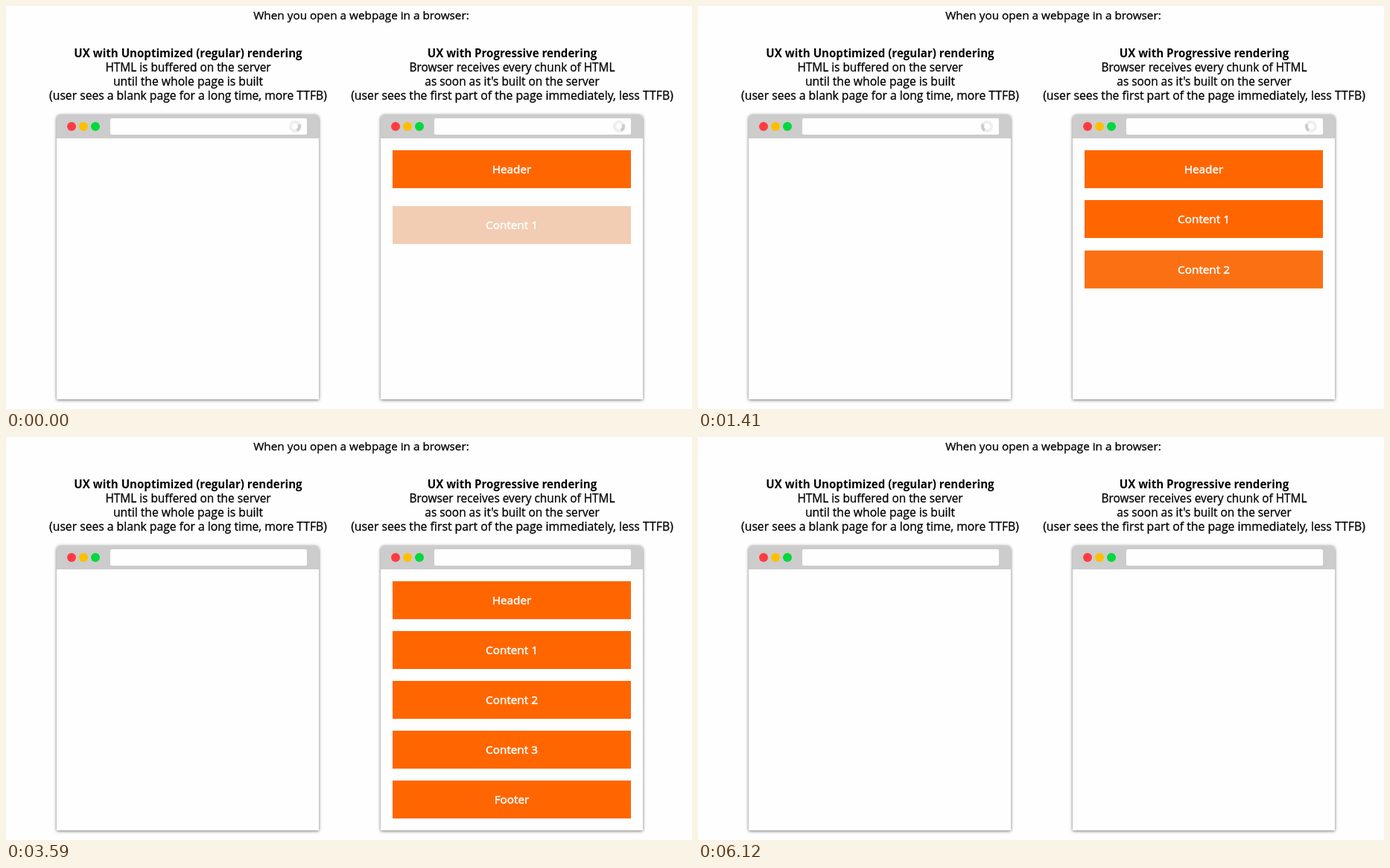
Write an HTML page that moves like this. It is 921x542 px and loops after 6.63 s.

```html
<!DOCTYPE html>
<html lang="en">
<head>
<meta charset="utf-8">
<title>Progressive rendering</title>
<style>
  html, body { margin: 0; width: 100%; height: 100%; overflow: hidden; background: #fefefe; }
  svg { display: block; width: 921px; height: 542px; }
  text { font-family: "Open Sans", "Noto Sans", sans-serif; text-anchor: middle; stroke: #000; stroke-width: .3px; }
  .bold { font-weight: 700; stroke: none; }
  .label { font-size: 15.3px; fill: #fff; stroke: #fff; stroke-width: .5px; }
  .frame { filter: drop-shadow(0 1px 2px rgba(0, 0, 0, .55)); }

  .page, .c1, .c2, .c3, .foot, .all, .load { animation: 6630ms infinite both; }
  .page { animation-name: page; animation-timing-function: step-end; }
  .c1 { animation-name: c1; }
  .c2 { animation-name: c2; }
  .c3 { animation-name: c3; }
  .foot { animation-name: foot; }
  .all { animation-name: all; }
  .load { animation-name: load; animation-timing-function: linear; }
  .spin { transform-origin: 388px 162px; animation: spin 6630ms linear infinite; }

  @keyframes page {
    0% { opacity: 1; }
    92.308%, 100% { opacity: 0; }
  }
  /* Each block rises 12px while it fades in from a duller tone; the first is already on its way. */
  @keyframes c1 {
    0% { opacity: .32; fill: #d86517; transform: translateY(8.2px); animation-timing-function: cubic-bezier(.2, .5, .3, 1); }
    10.709%, 100% { opacity: 1; fill: #f60; transform: translateY(0); }
  }
  @keyframes c2 {
    0%, 12.066% { opacity: 0; fill: #c8641e; transform: translateY(12px); animation-timing-function: ease; }
    25.641%, 100% { opacity: 1; fill: #f60; transform: translateY(0); }
  }
  @keyframes c3 {
    0%, 26.923% { opacity: 0; fill: #c8641e; transform: translateY(12px); animation-timing-function: ease; }
    40.498%, 100% { opacity: 1; fill: #f60; transform: translateY(0); }
  }
  @keyframes foot {
    0%, 41.629% { opacity: 0; fill: #c8641e; transform: translateY(12px); animation-timing-function: ease; }
    55.204%, 100% { opacity: 1; fill: #f60; transform: translateY(0); }
  }
  @keyframes all {
    0%, 56.41% { opacity: 0; transform: translateY(12px); animation-timing-function: ease; }
    69.231%, 100% { opacity: 1; transform: translateY(0); }
  }
  @keyframes load {
    0%, 48.265% { opacity: 1; }
    54.148%, 100% { opacity: 0; }
  }
  /* One turn per second over 6.63 s. */
  @keyframes spin {
    from { transform: rotate(108deg); }
    to { transform: rotate(2494.8deg); }
  }
</style>
</head>
<body>
<svg viewBox="0 0 921 542">
  <defs>
    <g id="window">
      <path class="frame" d="M68 529V151a5 5 0 0 1 5-5H415a5 5 0 0 1 5 5V529z" fill="#fefefe"/>
      <path d="M68 178V151a5 5 0 0 1 5-5H415a5 5 0 0 1 5 5V178z" fill="#ccc"/>
      <circle cx="88" cy="162" r="6" fill="#ff3b41"/>
      <circle cx="104" cy="162" r="6" fill="#ffbf00"/>
      <circle cx="120" cy="162" r="6" fill="#00d93c"/>
      <rect x="140" y="151" width="264" height="22" rx="2" fill="#fefefe"/>
    </g>
    <g id="spinner" fill="none" stroke-width="4">
      <circle cx="388" cy="162" r="6" stroke="#eee"/>
      <path d="M383.76 157.76A6 6 0 0 1 392.24 157.76" stroke="#c9c9c9"/>
    </g>
    <rect id="bar" x="84" width="320" height="51"/>
    <g id="header"><use href="#bar" y="194"/><text class="label" x="244" y="225">Header</text></g>
    <g id="one"><use href="#bar" y="261"/><text class="label" x="244" y="292">Content 1</text></g>
    <g id="two"><use href="#bar" y="328"/><text class="label" x="244" y="359">Content 2</text></g>
    <g id="three"><use href="#bar" y="395"/><text class="label" x="244" y="426">Content 3</text></g>
    <g id="footer"><use href="#bar" y="462"/><text class="label" x="244" y="493">Footer</text></g>
  </defs>

  <text x="477" y="18" font-size="15.3">When you open a webpage in a browser:</text>

  <text class="bold" x="244.5" y="69" font-size="15.1">UX with Unoptimized (regular) rendering</text>
  <text x="244.5" y="88" font-size="15.4">HTML is buffered on the server</text>
  <text x="244.5" y="107" font-size="15.7">until the whole page is built</text>
  <text x="244.5" y="126" font-size="15.7">(user sees a blank page for a long time, more TTFB)</text>

  <text class="bold" x="679.5" y="69" font-size="15.1">UX with Progressive rendering</text>
  <text x="679.5" y="88" font-size="15.4">Browser receives every chunk of HTML</text>
  <text x="679.5" y="107" font-size="15.4">as soon as it's built on the server</text>
  <text x="679.5" y="126" font-size="15.8">(user sees the first part of the page immediately, less TTFB)</text>

  <use href="#window"/>
  <g class="load"><g class="spin"><use href="#spinner"/></g></g>
  <g class="page" fill="#999">
    <g class="all">
      <use href="#header"/>
      <use href="#one"/>
      <use href="#two"/>
      <use href="#three"/>
      <use href="#footer"/>
    </g>
  </g>

  <g transform="translate(435 0)">
    <use href="#window"/>
    <g class="load"><g class="spin"><use href="#spinner"/></g></g>
    <g class="page" fill="#f60">
      <use href="#header"/>
      <g class="c1"><use href="#one"/></g>
      <g class="c2"><use href="#two"/></g>
      <g class="c3"><use href="#three"/></g>
      <g class="foot"><use href="#footer"/></g>
    </g>
  </g>
</svg>
</body>
</html>
```
